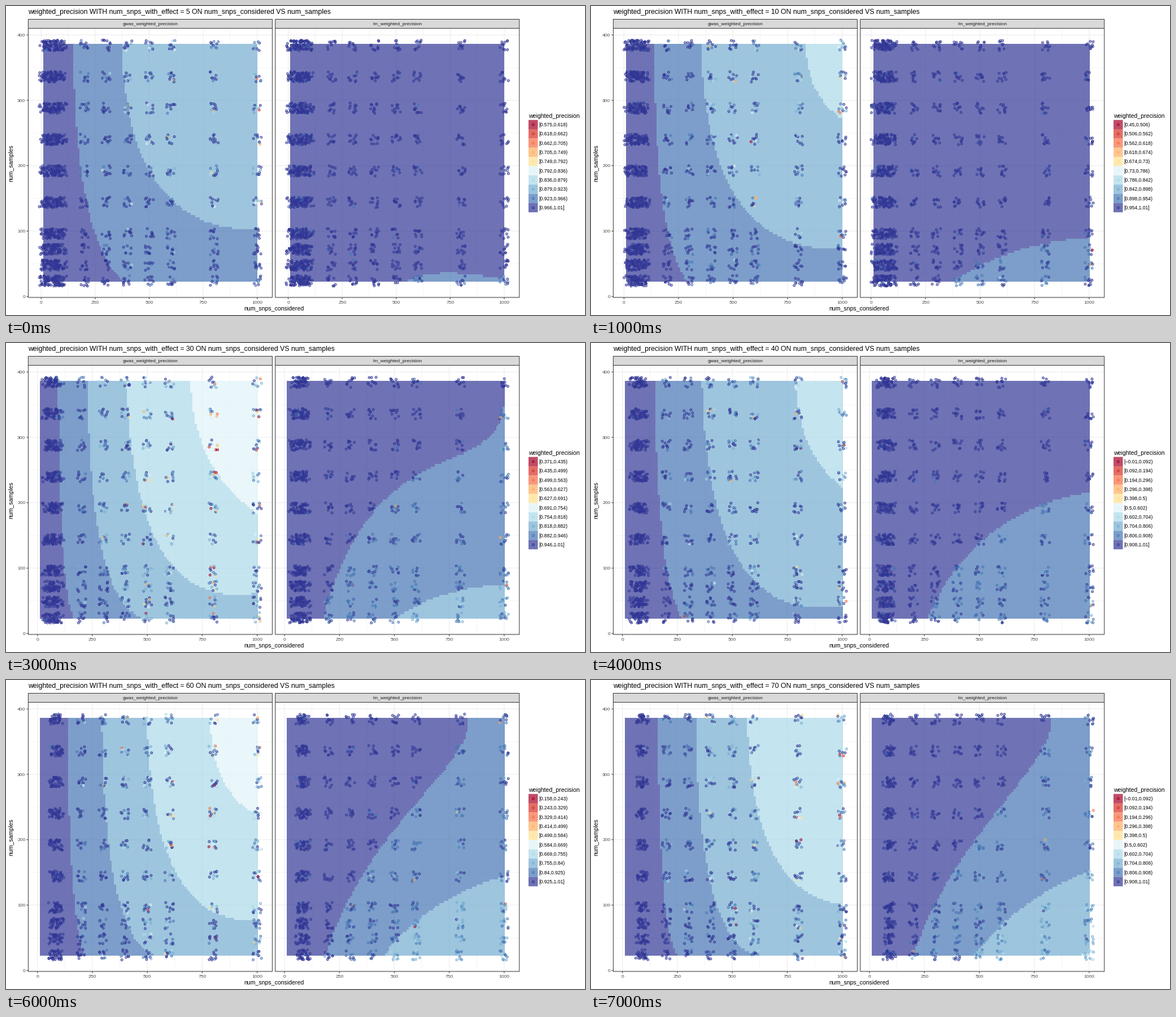
Write a matplotlib script that moves like this. It is 1025x547 px and loops after 8 s.

```python
import math

import numpy as np
import matplotlib.pyplot as plt
from matplotlib.animation import FuncAnimation
from matplotlib.collections import LineCollection
from matplotlib.colors import to_rgb
from matplotlib.patches import Rectangle
from matplotlib.path import Path

W, H, DPI = 1025, 547, 100
PX = 72 / DPI
plt.rcParams["font.family"] = "Liberation Sans"

# worst to best precision class
PALETTE = np.array([to_rgb(c) for c in (
    "#a50026", "#d73027", "#f46d43", "#fdae61", "#fee090",
    "#e0f3f8", "#abd9e9", "#74add1", "#4575b4", "#313695")])
TILE_ALPHA = 0.7
DARK, GREY = "#333333", "#4d4d4d"
PANEL_X, PANEL_W, SHIFT = 39.4, 432, 437.3
STRIP, TOP, BOTTOM = 23.5, 39.5, 516
TILE_TOP, TILE_BOTTOM = 67.5, 488
LEFT_EDGE, RIGHT_EDGE = 445, 882
CELLS = 100
SAMPLES = [24 * k for k in (1, 2, 3, *range(4, 17, 2))]
REPEATS = 10


def bezier(*points):
    t = np.linspace(0, 1, 40)[:, None]
    n = len(points) - 1
    return sum(math.comb(n, k) * t**k * (1 - t)**(n - k) * np.array(p)
               for k, p in enumerate(points))


def drop(x_top, corner_y, end_x, end_y=TILE_BOTTOM):
    """Falls from the top of the tiles, then bends towards its end."""
    corner = (x_top + 0.03 * (end_x - x_top), corner_y)
    return bezier((x_top, TILE_TOP), corner, (end_x, end_y))


def fall(x_top, corner_y, end_y):
    return drop(x_top, corner_y, LEFT_EDGE, end_y)


def rise(x_bottom, *points):
    return bezier((x_bottom, TILE_BOTTOM), *points)


# effect size, lowest break, break width, class borders of both panels
SCENES = [
    (5, 0.5748, 0.0435,
     [drop(119, 410, 207), fall(205, 400, 396)],
     [rise(707, (760, 460), (RIGHT_EDGE, 484))]),
    (10, 0.4501, 0.056,
     [drop(112, 425, 172), fall(195, 440, 430), fall(380, 160, 200)],
     [rise(640, (740, 420), (RIGHT_EDGE, 410))]),
    (20, 0.3267, 0.06832,
     [drop(103, 450, 153), fall(187, 500, 470), fall(320, 262, 317)],
     [rise(612, (710, 333), (RIGHT_EDGE, 323))]),
    (30, 0.37105, 0.0639,
     [drop(92, 422, 119), drop(144, 465, 245), fall(214, 482, 442),
      fall(326, 225, 303)],
     [rise(560, (660, 130), (870, 260), (RIGHT_EDGE, 100)),
      rise(690, (755, 437), (RIGHT_EDGE, 427))]),
    (40, -0.01, 0.102,
     [drop(113, 408, 161), fall(196, 508, 465), fall(361, 192, 258)],
     [rise(595, (675, 300), (RIGHT_EDGE, 264))]),
    (50, 0.21, 0.08,
     [drop(99, 415, 129), drop(152, 478, 240), fall(222, 488, 452),
      fall(328, 245, 302)],
     [rise(560, (640, 230), (825, 165), (823, TILE_TOP)),
      rise(660, (740, 380), (RIGHT_EDGE, 357))]),
    (60, 0.1582, 0.0852,
     [drop(109, 440, 141), drop(169, 465, 266), fall(249, 440, 425),
      fall(360, 200, 240)],
     [rise(565, (645, 245), (820, 162), (818, TILE_TOP)),
      rise(668, (745, 385), (RIGHT_EDGE, 348))]),
    (70, -0.01, 0.102,
     [drop(118, 455, 154), drop(185, 462, 293), fall(276, 378, 398)],
     [rise(570, (650, 260), (815, 160), (814, TILE_TOP)),
      rise(678, (750, 390), (RIGHT_EDGE, 338)),
      rise(865, (865, 481), (RIGHT_EDGE, 483))]),
]

fig = plt.figure(figsize=(W / DPI, H / DPI), dpi=DPI, facecolor="white")
ax = fig.add_axes([0, 0, 1, 1])


def y_px(value):
    return 514.2 - 1.1575 * value


def label(x, y, text, size, color="black", **kw):
    ax.text(x, y, text, fontsize=size * PX, color=color, zorder=8, **kw)


def box(x, y, w, h, face="none", edge="none", z=1, **kw):
    ax.add_patch(Rectangle((x, y), w, h, facecolor=face, edgecolor=edge,
                           linewidth=PX, zorder=z, snap=False, **kw))


def lines(segments, width, color, z):
    ax.add_collection(LineCollection(segments, linewidths=width * PX,
                                     colors=color, zorder=z, snap=False))


def circles(x, y, colors):
    ax.scatter(x, y, s=(3.9 * PX) ** 2, facecolors="none", edgecolors=colors,
               linewidths=0.95 * PX, zorder=5, snap=False)
    ax.scatter(x, y, s=(1.5 * PX) ** 2, c=colors, linewidths=0, zorder=5,
               snap=False)


def cell_centres(start, stop):
    return start + (np.arange(CELLS) + 0.5) * (stop - start) / CELLS


def cell_index(pos, start, stop):
    return np.clip((pos - start) / (stop - start) * CELLS,
                   0, CELLS - 1).astype(int)


def class_map(curves, side, left, right):
    """Number of class borders crossed at each tile."""
    gx, gy = np.meshgrid(cell_centres(left, right),
                         cell_centres(TILE_TOP, TILE_BOTTOM))
    cells = np.column_stack([gx.ravel(), gy.ravel()])
    classes = np.zeros(len(cells), int)
    far_x, far_y = right + 2, (TILE_TOP - 5, TILE_BOTTOM + 5)[side]
    for curve in curves:
        closing = [(far_x, curve[-1][1]), (far_x, far_y), (curve[0][0], far_y)]
        classes += Path(np.vstack([curve, closing])).contains_points(cells)
    return classes.reshape(CELLS, CELLS)


def draw_grid(x0, x_px):
    def grid(x_values, y_values, width):
        lines([[(x_px(v), TOP), (x_px(v), BOTTOM)] for v in x_values]
              + [[(x0, y_px(v)), (x0 + PANEL_W, y_px(v))] for v in y_values],
              width, "#ebebeb", 1)

    grid(range(125, 1000, 250), range(50, 400, 100), 0.5)
    grid(range(0, 1001, 250), range(0, 401, 100), 1)


def draw_points(rng, side, columns, x_px, classes):
    cx, cy = (g.ravel() for g in np.meshgrid(np.repeat(columns, REPEATS),
                                             SAMPLES))
    level = classes[cell_index(y_px(cy), TILE_TOP, TILE_BOTTOM),
                    cell_index(cx, 10, 1000)]
    if side == 0:
        loss = rng.exponential(0.2 + 0.5 * level + 0.07 * level**2)
    else:
        loss = rng.normal(0.3 + 0.9 * level, np.where(level > 0, 0.7, 0.4))
        loss += 5 * ((rng.random(loss.size) < 0.01) & (level > 0))
    kind = 9 - np.clip(np.floor(loss), 0, 9).astype(int)
    x = x_px(cx + rng.uniform(-20, 20, cx.size))
    y = y_px(cy + rng.uniform(-8, 8, cy.size))
    circles(x, y, PALETTE[kind])


def draw_panel(rng, side, effect, curves):
    x0 = PANEL_X + side * SHIFT
    columns = [v for v in range(10, 101, 10) if v > effect]
    columns += [200, 300, 400, 500, 600, 800, 1000]
    lowest, highest = min(8, columns[0] - 19), 1017

    def x_px(value):
        part = (value - lowest) / (highest - lowest)
        return x0 + 19.4 + 392.4 * part

    draw_grid(x0, x_px)
    left, right = x_px(10), x_px(1000)
    classes = class_map(curves, side, left, right)
    ax.imshow(PALETTE[9 - classes], extent=(left, right, TILE_BOTTOM, TILE_TOP),
              alpha=TILE_ALPHA, interpolation="nearest", aspect="auto", zorder=2)
    draw_points(rng, side, columns, x_px, classes)

    box(x0, TOP, PANEL_W, BOTTOM - TOP, edge=DARK, z=6)
    box(x0, STRIP, PANEL_W, TOP - STRIP, "#d9d9d9", DARK, 6)
    name = ("gwas", "lm")[side] + "_weighted_precision"
    label(x0 + PANEL_W / 2, 34, name, 8.5, "#1a1a1a", ha="center")

    for value in range(0, 1001, 250):
        x = x_px(value)
        lines([[(x, BOTTOM), (x, BOTTOM + 3)]], 1, DARK, 6)
        label(x, 527, str(value), 8.5, GREY, ha="center")


def draw_legend(low, step):
    def fmt(value):
        return f"{round(value, 3):g}".replace("-", "\u2212")

    label(925, 198, "weighted_precision", 10.45)
    size = 16.35
    for i, color in enumerate(PALETTE):
        y = 201.7 + i * size
        box(925, y, 16.5, size, color, z=2, alpha=TILE_ALPHA)
        circles([933.3], [y + size / 2], [color])
        a, b = fmt(low + i * step), fmt(low + (i + 1) * step)
        label(943, y + size / 2 + 3, f"[{a},{b}" + ("]" if i == 9 else ")"),
              8.6)


def draw(i):
    effect, low, step, *borders = SCENES[i]
    rng = np.random.default_rng(effect)
    ax.clear()
    ax.axis("off")
    label(38.8, 14.3, f"weighted_precision WITH num_snps_with_effect = {effect} "
          "ON num_snps_considered VS num_samples", 12.27)
    for side, curves in enumerate(borders):
        draw_panel(rng, side, effect, curves)
    for value in range(0, 401, 100):
        y = y_px(value)
        lines([[(PANEL_X - 3, y), (PANEL_X, y)]], 1, DARK, 6)
        label(34.3, y + 2.7, str(value), 8.5, GREY, ha="right")
    label(474, 539, "num_snps_considered", 10.5, ha="center")
    label(9.5, 278, "num_samples", 10.5, rotation=90, ha="center", va="center")
    draw_legend(low, step)
    ax.set_xlim(0, W)
    ax.set_ylim(H, 0)
    return []


anim = FuncAnimation(fig, draw, frames=len(SCENES), interval=1000,
                     init_func=lambda: [], repeat=True, repeat_delay=0)
plt.show()
```
